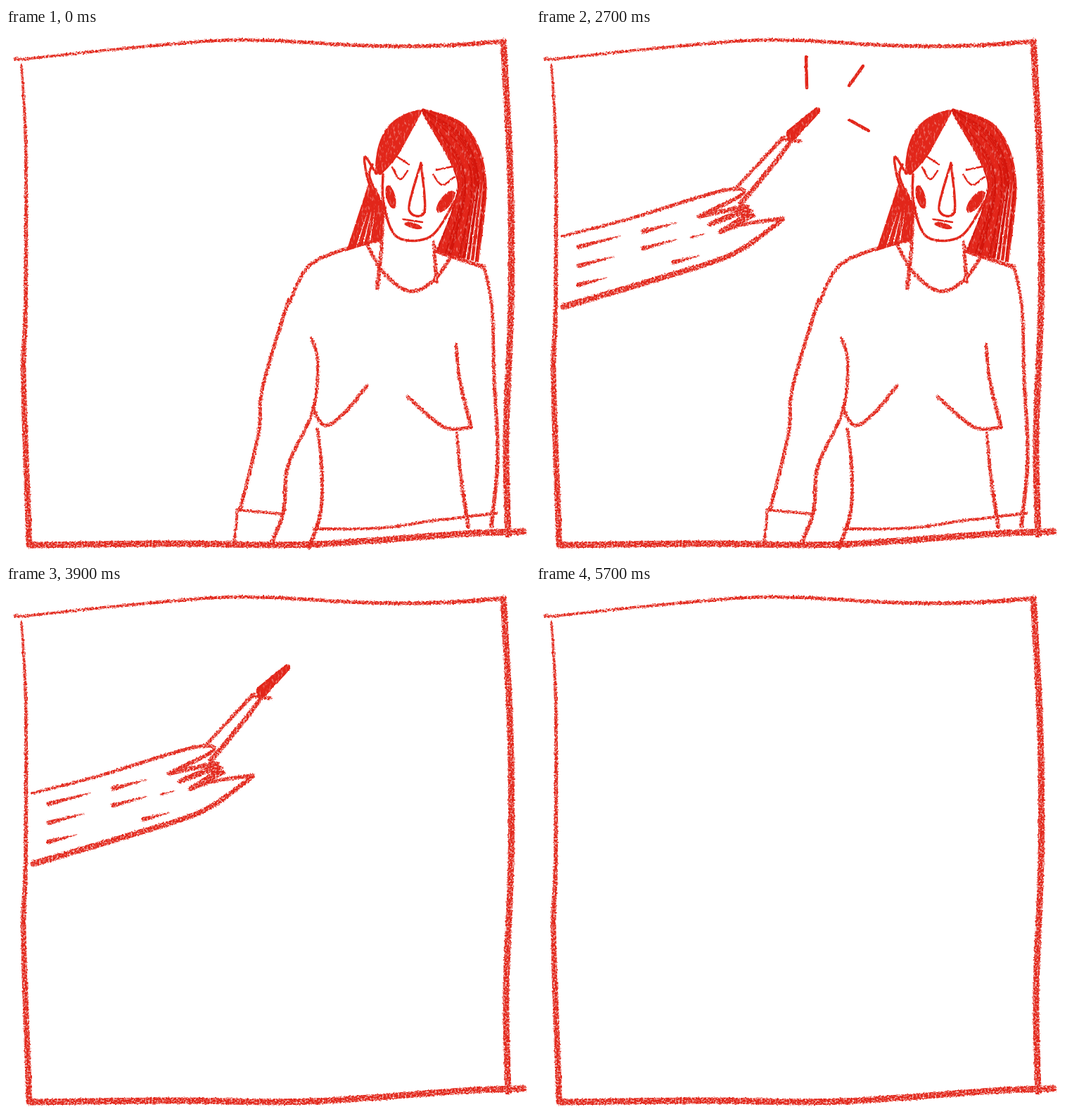
These frames come from a looping animation (745x752 px, 6700 ms). An HTML page:

```html
<!DOCTYPE html>
<html lang="en">
<head>
<meta charset="utf-8">
<title>Crayon drawing</title>
<style>
  html, body { margin: 0; width: 100%; height: 100%; overflow: hidden; background: #fff; }
  svg { display: block; width: 745px; height: 752px; }
  path, ellipse { fill: #e2261a; }
  .dark { fill: #d3150b; }
  .gap { fill: #fff; }
  .crayon { filter: url(#crayon); }
  .wax { filter: url(#wax); }
  #woman, #arm, #sparks { animation: 6700ms step-end infinite; }
  #woman { animation-name: woman; }
  #arm { animation-name: arm; }
  #sparks { animation-name: sparks; }
  @keyframes woman {
    0% { visibility: visible; }
    58.208%, 100% { visibility: hidden; }
  }
  @keyframes arm {
    0% { visibility: hidden; transform: translate(-221px, 150px); }
    29.85% { visibility: visible; transform: translate(-221px, 150px); }
    31.343% { visibility: visible; transform: translate(-88px, 71px); }
    32.835% { visibility: visible; transform: translate(0, 0); }
    79.104% { visibility: visible; transform: translate(-88px, 71px); }
    82.089% { visibility: visible; transform: translate(-221px, 150px); }
    85.074%, 100% { visibility: hidden; transform: translate(-221px, 150px); }
  }
  @keyframes sparks {
    0% { visibility: hidden; }
    40.298% { visibility: visible; }
    55.223%, 100% { visibility: hidden; }
  }
</style>
</head>
<body>
<svg viewBox="0 0 745 752">
  <defs>
    <filter id="crayon" filterUnits="userSpaceOnUse" x="0" y="0" width="745" height="752" color-interpolation-filters="sRGB">
      <feTurbulence type="fractalNoise" baseFrequency=".4" numOctaves="2" seed="4" result="noise"/>
      <feDisplacementMap in="SourceGraphic" in2="noise" scale="4" xChannelSelector="R" yChannelSelector="G" result="rough"/>
      <feColorMatrix in="noise" values="0 0 0 0 0  0 0 0 0 0  0 0 0 0 0  0 0 0 2.6 -.4" result="grain"/>
      <feComposite in="rough" in2="grain" operator="in"/>
    </filter>
    <filter id="wax" filterUnits="userSpaceOnUse" x="0" y="0" width="745" height="752" color-interpolation-filters="sRGB">
      <feTurbulence type="fractalNoise" baseFrequency=".35 .15" numOctaves="2" seed="9" result="noise"/>
      <feDisplacementMap in="SourceGraphic" in2="noise" scale="2.5" xChannelSelector="R" yChannelSelector="G" result="rough"/>
      <feColorMatrix in="noise" values="0 0 0 0 0  0 0 0 0 0  0 0 0 0 0  0 0 0 1.6 .3" result="grain"/>
      <feComposite in="rough" in2="grain" operator="in"/>
    </filter>
    <clipPath id="inside"><rect x="23" y="0" width="722" height="752"/></clipPath>
  </defs>

  <g id="woman">
    <g class="wax" id="hair">
      <path d="M592 115Q553 122 538 147Q524 170 525 208L533 209Q555 188 565 168L590 122Z"/>
      <path d="M515 222L526 240L538 252L534 301L484 317Z"/>
    </g>
    <g class="wax" id="face">
      <ellipse cx="547" cy="240" rx="6.5" ry="17" transform="rotate(-14 547 240)"/>
      <ellipse cx="625" cy="247" rx="8" ry="19" transform="rotate(38 625 247)"/>
      <ellipse cx="579" cy="281" rx="13" ry="4" transform="rotate(15 579 281)"/>
    </g>
    <g class="crayon" id="body"></g>
  </g>

  <g clip-path="url(#inside)">
    <g id="arm">
      <g class="wax" id="tip"></g>
      <g class="crayon" id="limb"></g>
    </g>
  </g>
  <g class="wax" id="sparks"></g>
  <g class="crayon" id="border"></g>
</svg>

<script>
const NS = 'http://www.w3.org/2000/svg';
const pt = (x, y) => x.toFixed(1) + ' ' + y.toFixed(1);
const mix = (a, b, t) => a + (b - a) * t;
const parse = line => line.split(',').map(s => s.trim().split(' ').map(Number));

let seed = 7;
const random = () => (seed = seed * 16807 % 2147483647) / 2147483647;

const spline = (a, b, c, d, t) =>
  b + t * (c - a + t * (2 * a - 5 * b + 4 * c - d + t * (3 * (b - c) + d - a))) / 2;

// A smooth curve through a few key points.
function curve(keys, steps = 16) {
  const out = [];
  for (let i = 0; i < keys.length - 1; i++) {
    const [b, c] = [keys[i], keys[i + 1]];
    const a = keys[i - 1] || b, d = keys[i + 2] || c;
    for (let k = 0; k < steps; k++)
      out.push([0, 1].map(j => spline(a[j], b[j], c[j], d[j], k / steps)));
  }
  return [...out, keys[keys.length - 1]];
}

function add(id, d, cls = '') {
  const p = document.createElementNS(NS, 'path');
  p.setAttribute('d', d);
  p.setAttribute('class', cls);
  document.getElementById(id).append(p);
}

// A round-ended line whose width runs from w0 to w1.
function stroke(id, keys, w0, w1 = w0, cls = '') {
  const points = curve(keys);
  let d = '', last;
  points.forEach(([x, y], i) => {
    const r = mix(w0, w1, i / (points.length - 1)) / 2;
    d += `M${pt(x - r, y)}a${r} ${r} 0 1 0 ${2 * r} 0a${r} ${r} 0 1 0 ${-2 * r} 0z`;
    if (last) {
      const [u, v, s] = last, len = Math.hypot(x - u, y - v) || 1;
      const nx = (v - y) / len, ny = (x - u) / len;
      d += `M${pt(u + nx * s, v + ny * s)}L${pt(x + nx * r, y + ny * r)}` +
           `L${pt(x - nx * r, y - ny * r)}L${pt(u - nx * s, v - ny * s)}z`;
    }
    last = [x, y, r];
  });
  add(id, d, cls);
}

const draw = (id, w0, w1, ...lines) => lines.forEach(l => stroke(id, parse(l), w0, w1));

// Border
draw('border', 3, 6, '16 42, 26 44, 170 29, 330 17, 510 25, 620 25, 706 19');
draw('border', 3, 9, '22 52, 28 170, 28 390, 25 500, 33 734');
draw('border', 9, 9,
  '33 735, 240 733, 430 734, 650 719, 736 716',
  '707 19, 717 210, 718 390, 711 580, 714 720');

// Face
draw('face', 3.5, 3.5,
  '536 208, 537 250, 556 297, 604 296, 638 246',
  '536 252, 516 220, 510 183, 526 207',
  '521 194, 517 212, 534 248',
  '590 192, 573 257, 595 261, 590 192');
draw('face', 2.6, 2.6,
  '553 181, 573 194',
  '611 202, 635 197',
  '549 198, 560 215, 571 203',
  '607 208, 620 223, 637 212',
  '565 272, 592 276');

// Long hair: a band between two curves, with strands along it
const inner = parse('592 121, 638 205, 638 248, 612 318');
const outer = parse('592 114, 655 140, 683 215, 672 333');
const band = [...curve(inner), ...curve(outer).reverse()];
add('hair', 'M' + band.map(p => pt(...p)).join('L') + 'z');
const strand = t => inner.map((p, i) => p.map((v, j) => mix(v, outer[i][j], t)));
for (let i = 0; i < 12; i++) stroke('hair', strand(random()), .6, 2.5, 'dark');
for (let i = 0; i < 3; i++) {
  stroke('hair', strand(.7 + .1 * i).slice(2), .3, 1.6, 'gap');
  stroke('hair', [[524 - 5 * i, 262], [516 - 9 * i, 312]], .3, 1.8, 'gap');
}

// Body
draw('body', 4, 6,
  '537 250, 533 320, 528 369',
  '608 304, 612 360',
  '434 440, 443 475, 436 545, 401 622, 395 685, 379 729',
  '443 570, 449 630, 447 690, 431 738',
  '640 450, 645 500, 661 567',
  '641 575, 647 640, 657 709',
  '611 318, 680 340',
  '680 340, 691 400, 694 500, 699 610, 690 708');
draw('body', 5, 5,
  '512 305, 537 348, 573 374, 607 360, 633 325',
  '533 301, 480 315, 430 339, 402 392',
  '402 386, 365 510, 359 576, 333 684',
  '436 540, 453 565, 480 548, 513 509',
  '571 524, 622 567, 658 568');
draw('body', 4, 4,
  '328 685, 395 691',
  '329 686, 325 729',
  '437 712, 530 711, 610 700, 697 690');

// Arm
draw('limb', 4, 6,
  '37 296, 130 272, 262 232, 295 235, 232 268',
  '282 230, 352 155',
  '262 290, 300 278, 351 271',
  '350 158, 375 161');
draw('limb', 6, 9, '351 272, 280 321, 185 353, 39 396');
draw('limb', 7, 6, '291 250, 335 197, 363 160');
draw('tip', 17, 9, '364 151, 400 117');

const fingers = [];
for (let i = 0; i < 3; i++)
  fingers.push([232 + 15 * i, 268 + 11 * i], [301 + 4 * i, 254 + 6 * i]);
stroke('limb', fingers, 6);

const dash = (x, y, len, w = 7) => stroke('limb', [[x, y], [x + len, y - len * .26]], w, 1);
for (let i = 0; i < 3; i++) dash(61, 311 + 27 * i, 60 - 10 * i);
for (let i = 0; i < 2; i++) dash(153, 289 + 24 * i, 47);
dash(196, 333, 36);
dash(220, 298, 20, 3);

draw('sparks', 4.5, 4.5, '384 41, 385 85', '465 54, 445 82', '446 131, 473 146');
</script>
</body>
</html>
```
